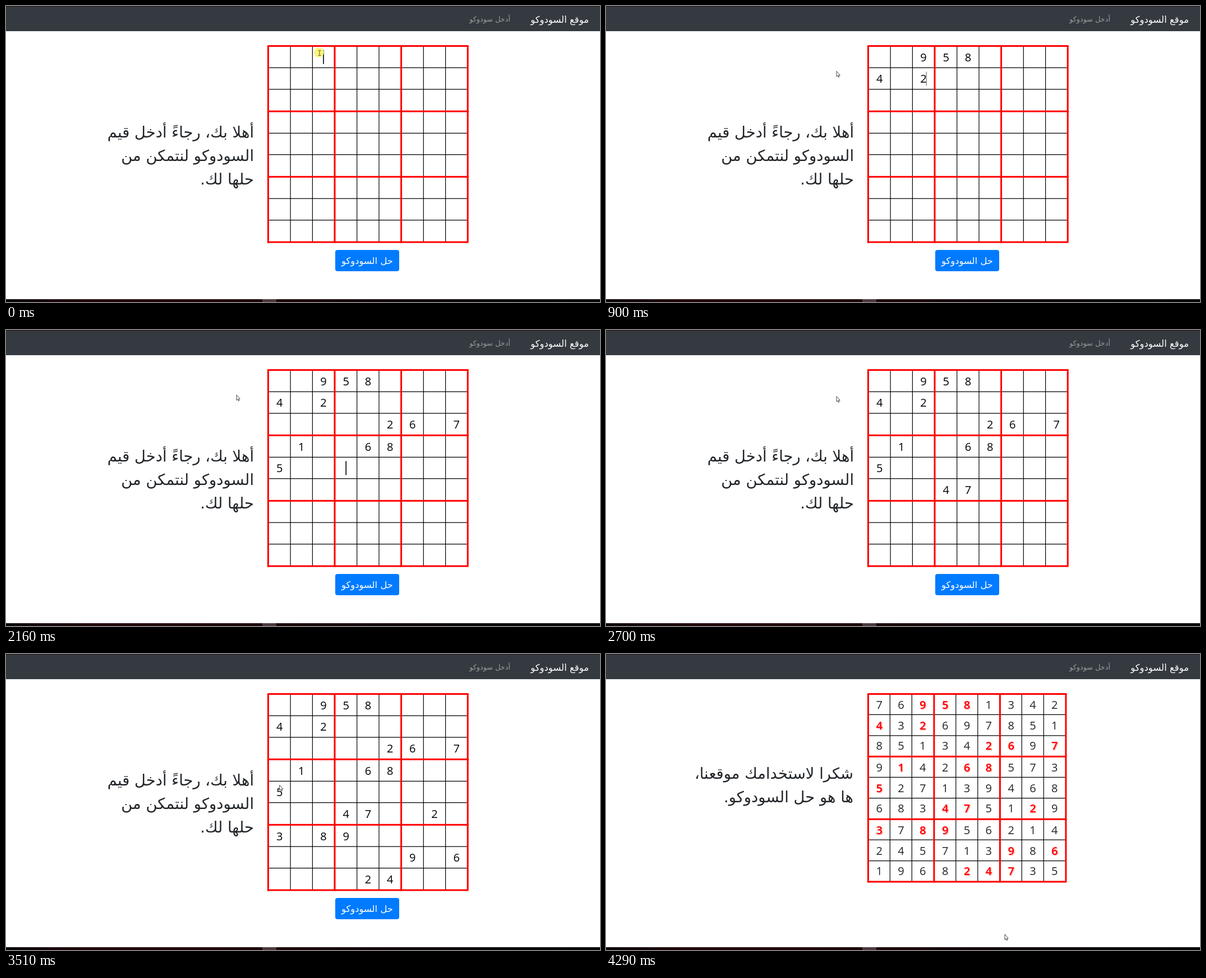
Animation of 1059 by 529 pixels, one loop 7.29 s. Source, as an HTML page:

```html
<!DOCTYPE html>
<html lang="ar">
<head>
<meta charset="utf-8">
<style>
  html, body { margin: 0; width: 100%; height: 100%; overflow: hidden; background: #fff; }
  svg { display: block; width: 1059px; height: 529px; }
  .ar { font-family: "DejaVu Sans", sans-serif; direction: rtl; fill: #212529; }
  .head { font-size: 27.4px; }
  .digit { font: 20px "Open Sans", "Noto Sans", sans-serif; text-anchor: middle; }
  .given { font-weight: 600; fill: #f00; text-shadow: 1px 1px 2px rgba(255, 0, 0, .5); }
  .thin { stroke: #000; stroke-width: 1.2; }
  .thick { stroke: #f00; stroke-width: 3; stroke-linecap: square; }
  .pointer { fill: #fff; stroke: #333; stroke-width: .9; }
</style>
</head>
<body>
<svg viewBox="0 0 1059 529">
  <defs>
    <linearGradient id="bar">
      <stop offset="0" stop-color="#0a0304"/>
      <stop offset=".15" stop-color="#22040a"/>
      <stop offset=".45" stop-color="#1c0408"/>
      <stop offset=".75" stop-color="#0c0506"/>
      <stop offset="1" stop-color="#060606"/>
    </linearGradient>
  </defs>
  <rect width="1059" height="45" fill="#343a40"/>
  <rect width="1059" height="1" fill="#2c0a12"/>
  <rect y="524" width="1059" height="5" fill="url(#bar)"/>
  <rect x="457" y="524" width="25" height="5" fill="#4b3a3d"/>
  <text class="ar" x="1039" y="30" style="font-size:16.5px;fill:#fff">موقع السودوكو</text>
  <text class="ar" x="899" y="28" style="font-size:12.8px;fill:#999c9f">أدخل سودوكو</text>

  <g id="entry">
    <text class="ar head" x="442" y="235">أهلا بك، رجاءً أدخل قيم</text>
    <text class="ar head" x="442" y="277">السودوكو لنتمكن من</text>
    <text class="ar head" x="442" y="319">حلها لك.</text>
    <rect id="button" x="587" y="436" width="114" height="38" rx="4"/>
    <text class="ar" x="644" y="461" text-anchor="middle" style="font-size:16.4px;fill:#fff">حل السودوكو</text>
  </g>
  <g id="solved">
    <text class="ar head" x="441" y="223">شكرا لاستخدامك موقعنا،</text>
    <text class="ar head" x="441" y="265">ها هو حل السودوكو.</text>
  </g>

  <rect id="caret" height="25"/>
  <g id="beam">
    <circle cx="558" cy="83" r="8.7" fill="#fbf57c"/>
    <path d="M556.5 79.5h1.7l.8.7.8-.7h1.7M559 80v8M556.5 88.5h1.7l.8-.7.8.7h1.7" fill="none" stroke="#55532c"/>
  </g>
  <path id="arrow" class="pointer" d="M0 0V9.6L2.1 7.7 3.5 10.8 4.9 10.2 3.6 7.1H6.2Z"/>
  <path id="hand" class="pointer" d="M642 465q1-1.4 2 0v3.6l4 .9q1 .4.8 1.8l-.8 3.2v2h-5l-3-4.6q0-1.4 1.3-.8l.7.8Z"/>
</svg>
<script>
const $ = id => document.getElementById(id);
const digits = '769581342432697851851342697914268573527139468683475129378956214245713986196824735';
const givens = [2, 3, 4, 9, 11, 23, 24, 26, 28, 31, 32, 36, 48, 49, 52, 54, 56, 57, 69, 71, 76, 77, 78];

// Per axis: block pitch, two inner line offsets, first cell centre, cell pitch
const entryAxes = [[118.6, 39.7, 79, 20.2, 39.2], [116.9, 39, 77.4, 20.3, 38.7]];
const solvedAxes = [[117.5, 38.9, 77.9, 19.8, 38.8], [111.9, 37, 74.4, 19.6, 36.7]];
const origin = [467.4, 71.4];

// [step, cell] while tabbing, and [step, x, y] of the arrow
const typing = [[0, 2], [10, 11], [17, 26], [18, 28], [27, 45], [30, 50], [35, 72], [38, 76], [40, 78]];
const mouse = [[1, 868, 100], [2, 868, 104], [4, 411, 116], [10, 411, 116], [18, 411, 117],
  [22, 411, 113], [26, 411, 118], [38, 411, 118], [41, 641, 465]];

function add(parent, tag, attrs, text = '') {
  const el = document.createElementNS('http://www.w3.org/2000/svg', tag);
  for (const key in attrs) el.setAttribute(key, attrs[key]);
  el.textContent = text;
  return parent.appendChild(el);
}

function center(axes, cell) {
  return [cell % 9, Math.floor(cell / 9)].map((i, k) => {
    const [block, , , first, pitch] = axes[k];
    return origin[k] + Math.floor(i / 3) * block + first + i % 3 * pitch;
  });
}

function drawGrid(group, axes) {
  const [x0, y0] = origin;
  const x1 = x0 + 3 * axes[0][0], y1 = y0 + 3 * axes[1][0];
  for (const cls of ['thin', 'thick']) {
    for (let i = 0; i < 10; i++) {
      if ((i % 3 === 0) !== (cls === 'thick')) continue;
      const [x, y] = axes.map((a, k) => origin[k] + Math.floor(i / 3) * a[0] + (i % 3 && a[i % 3]));
      add(group, 'path', { class: cls, d: `M${x} ${y0}V${y1}M${x0} ${y}H${x1}` });
    }
  }
}

function drawDigit(group, axes, cell, cls) {
  const [x, y] = center(axes, cell);
  return add(group, 'text', { class: 'digit ' + cls, x, y: y + 7 }, digits[cell]);
}

function track(keys, n) {
  const i = keys.findIndex(k => k[0] > n);
  if (i < 0) return keys.at(-1).slice(1);
  if (i === 0) return keys[0].slice(1);
  const a = keys[i - 1], b = keys[i], u = (n - a[0]) / (b[0] - a[0]);
  return a.slice(1).map((v, k) => v + (b[k + 1] - v) * u);
}

function show(el, on) { el.style.display = on ? '' : 'none'; }

drawGrid($('entry'), entryAxes);
drawGrid($('solved'), solvedAxes);
const typed = givens.map(cell => drawDigit($('entry'), entryAxes, cell, ''));
for (let cell = 0; cell < 81; cell++) {
  const given = givens.includes(cell);
  drawDigit($('solved'), solvedAxes, cell, given ? 'given' : '').style.fill = given ? '' : '#212529';
}

function draw() {
  const t = performance.now() % 7290;
  const n = Math.min(41, Math.floor(t / 90));
  const done = t >= 4290, hover = n === 41 && !done;
  const cell = Math.floor(track(typing, n)[0] + 1e-6);
  const filled = n > 0 && givens.includes(cell);

  show($('entry'), !done);
  show($('solved'), done);
  typed.forEach((el, i) => show(el, n > 0 && givens[i] <= cell));
  $('button').setAttribute('fill', hover ? '#0069d9' : '#007bff');

  const [cx, cy] = center(entryAxes, cell);
  const caret = $('caret');
  show(caret, !done && n % 8 < 6);
  caret.setAttribute('x', filled ? cx + 4.6 : cx - .8);
  caret.setAttribute('y', cy - 13);
  caret.setAttribute('width', filled ? 1 : 1.6);
  caret.setAttribute('fill', filled ? '#555' : '#000');

  const [mx, my] = done ? [711, 500.5] : track(mouse, n);
  show($('beam'), n === 0);
  show($('hand'), hover);
  show($('arrow'), n > 0 && !hover);
  $('arrow').setAttribute('transform', `translate(${mx} ${my + .5})`);
  requestAnimationFrame(draw);
}
draw();
</script>
</body>
</html>
```
